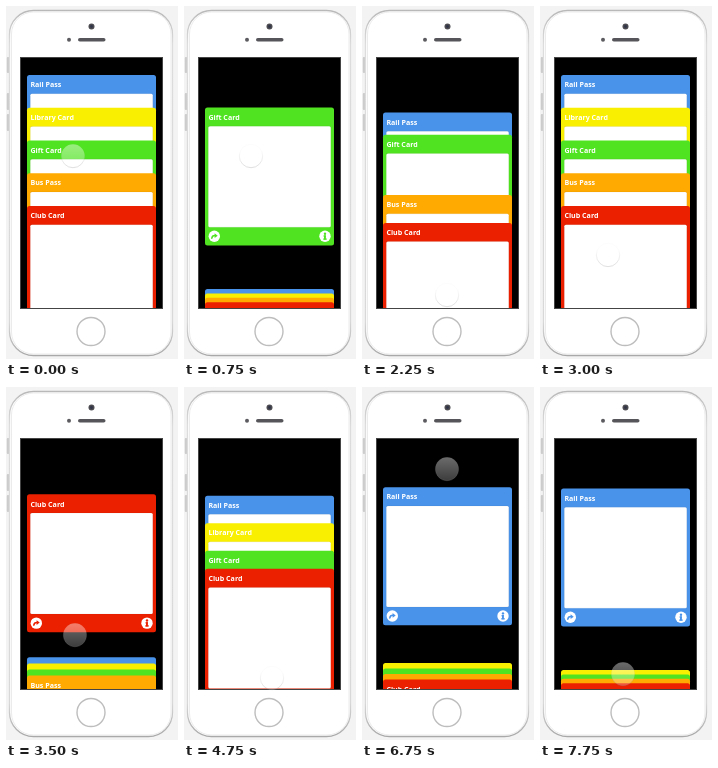
Animation, 172 px wide and 353 px high, one loop 8000 ms. Source, as an HTML page with a canvas:

```html
<!DOCTYPE html>
<html lang="en">
<head>
<meta charset="utf-8">
<title>Card wallet</title>
<style>
  html, body { margin: 0; width: 100%; height: 100%; overflow: hidden; background: #f3f3f3; }
  canvas { display: block; width: 172px; height: 353px; }
</style>
</head>
<body>
<canvas id="stage"></canvas>
<script>
const W = 172, H = 353, LOOP = 8000, STEP = 250;
const canvas = document.getElementById('stage');
const ctx = canvas.getContext('2d');
const scale = window.devicePixelRatio || 1;
canvas.width = W * scale;
canvas.height = H * scale;

const cards = [
  ['Rail Pass', '#4993ea'],
  ['Library Card', '#f9ef00'],
  ['Gift Card', '#50e321'],
  ['Bus Pass', '#ffaa00'],
  ['Club Card', '#eb2000']
].map(([name, color], i) => ({ name, color, listY: 69 + i * 32.75 }));

const OPEN_Y = 101.5, STACK_Y = 283, STACK_GAP = 4.4, MOVE_MS = 500;

// Which card opens, when it opens and when it goes back to the list.
const visits = [
  { card: 2, open: 200, close: 2030 },
  { card: 4, open: 3195, close: 4535 },
  { card: 0, open: 6420, close: Infinity }
];

// Finger positions: time, x, y.
const touchPath = [
  [0, 67, 150], [1200, 67, 150], [1500, 67, 186], [2000, 85, 289],
  [2250, 85, 289], [2900, 68, 249], [3600, 69, 248], [4400, 88, 291],
  [4800, 88, 291], [5900, 85, 82], [6900, 85, 82], [7600, 83, 287], [LOOP, 83, 287]
];

const clamp = v => Math.max(0, Math.min(1, v));
const lerp = (a, b, p) => a + (b - a) * p;
const easeOut = u => 1 - (1 - clamp(u)) ** 3;
const smooth = u => u * u * (3 - 2 * u);

function rounded(x, y, w, h, r) {
  ctx.beginPath();
  ctx.roundRect(x, y, w, h, r);
}

function fillRounded(x, y, w, h, r, color) {
  rounded(x, y, w, h, r);
  ctx.fillStyle = color;
  ctx.fill();
}

function disc(x, y, r, color) {
  ctx.beginPath();
  ctx.arc(x, y, r, 0, Math.PI * 2);
  ctx.fillStyle = color;
  ctx.fill();
}

function strokePath(color, width) {
  ctx.strokeStyle = color;
  ctx.lineWidth = width;
  ctx.stroke();
}

function verticalFade(top, bottom, from, to) {
  const fade = ctx.createLinearGradient(0, top, 0, bottom);
  fade.addColorStop(0, from);
  fade.addColorStop(1, to);
  return fade;
}

function drawPhone() {
  ctx.fillStyle = '#f3f3f3';
  ctx.fillRect(0, 0, W, H);
  for (const [y, h] of [[51, 16], [87, 17], [108, 17]]) {
    fillRounded(0.8, y, 2.5, h, 1, '#cccccc');
  }

  const rim = ctx.createLinearGradient(0, 4, 0, 350);
  rim.addColorStop(0, '#b8b8b8');
  rim.addColorStop(0.1, '#dcdcdc');
  rim.addColorStop(0.9, '#d8d8d8');
  rim.addColorStop(1, '#a8a8a8');
  fillRounded(3.5, 4.5, 163, 345, 24, '#fff');
  strokePath(rim, 1.3);
  rounded(5.5, 6, 159.5, 342, 22);
  strokePath('#e6e6e6', 0.8);

  disc(85.5, 20.5, 3, '#4b4b50');
  disc(85.5, 20.5, 1.4, '#303447');
  disc(63, 33.8, 2, '#5c5c60');
  fillRounded(72, 32, 27.5, 3.6, 1.8, '#55555a');

  ctx.beginPath();
  ctx.arc(85, 325.5, 14, 0, Math.PI * 2);
  strokePath('#bdbdbd', 1.4);
  ctx.fillStyle = '#444';
  ctx.fillRect(14, 51, 143, 252);
  ctx.fillStyle = '#000';
  ctx.fillRect(15, 52, 141, 250);
}

function drawIcons(y, color) {
  disc(30.3, y, 5.7, '#fff');
  disc(141, y, 5.7, '#fff');

  ctx.lineCap = 'round';
  ctx.beginPath();
  ctx.moveTo(27.8, y + 2);
  ctx.quadraticCurveTo(28, y - 0.7, 31, y - 0.7);
  strokePath(color, 1.5);
  ctx.beginPath();
  ctx.moveTo(30.6, y - 3);
  ctx.lineTo(33.7, y - 0.6);
  ctx.lineTo(30.6, y + 1.8);
  ctx.fillStyle = color;
  ctx.fill();

  disc(141, y - 2.6, 1.2, color);
  ctx.fillRect(139.5, y - 0.9, 2.4, 1.2);
  ctx.fillRect(140, y - 0.9, 1.9, 4.2);
  ctx.fillRect(139.2, y + 2.2, 3.6, 1.2);
}

function drawCard({ name, color }, y) {
  fillRounded(21, y, 129, 138, 2.5, color);
  fillRounded(24.3, y + 18.7, 122.5, 101, 1.5, '#fff');
  strokePath('rgba(0,0,0,.1)', 0.5);
  ctx.fillStyle = '#fff';
  ctx.font = 'bold 7.1px "Open Sans", "Noto Sans", sans-serif';
  ctx.fillText(name, 24.4, y + 12.2);
  drawIcons(y + 128.8, color);
}

function drawCards(time) {
  const visit = visits.filter(v => v.open <= time).pop();
  const openness = !visit ? 0 : time < visit.close
    ? easeOut((time - visit.open) / MOVE_MS)
    : 1 - easeOut((time - visit.close) / MOVE_MS);

  ctx.save();
  ctx.beginPath();
  ctx.rect(15, 52, 141, 250);
  ctx.clip();
  let slot = 0;
  cards.forEach((card, i) => {
    const selected = visit && visit.card === i;
    const goal = selected ? OPEN_Y : STACK_Y + STACK_GAP * slot++;
    drawCard(card, lerp(card.listY, goal, openness));
  });
  ctx.restore();
}

function drawTouch(time) {
  const next = touchPath.findIndex(p => p[0] > time);
  const [t0, x0, y0] = touchPath[next - 1];
  const [t1, x1, y1] = touchPath[next];
  const p = smooth((time - t0) / (t1 - t0));
  const x = lerp(x0, x1, p), y = lerp(y0, y1, p), r = 11.7;

  disc(x, y, r, verticalFade(y - r, y + r, 'rgba(255,255,255,.42)', 'rgba(255,255,255,.24)'));
  ctx.beginPath();
  ctx.arc(x, y, r, 0, Math.PI * 2);
  strokePath(verticalFade(y - r / 2, y + r, 'rgba(130,130,130,.03)', 'rgba(130,130,130,.32)'), 0.8);
}

function frame(now) {
  const time = Math.floor((now % LOOP) / STEP) * STEP;
  ctx.setTransform(scale, 0, 0, scale, 0, 0);
  drawPhone();
  drawCards(time);
  drawTouch(time);
  requestAnimationFrame(frame);
}

requestAnimationFrame(frame);
</script>
</body>
</html>
```
